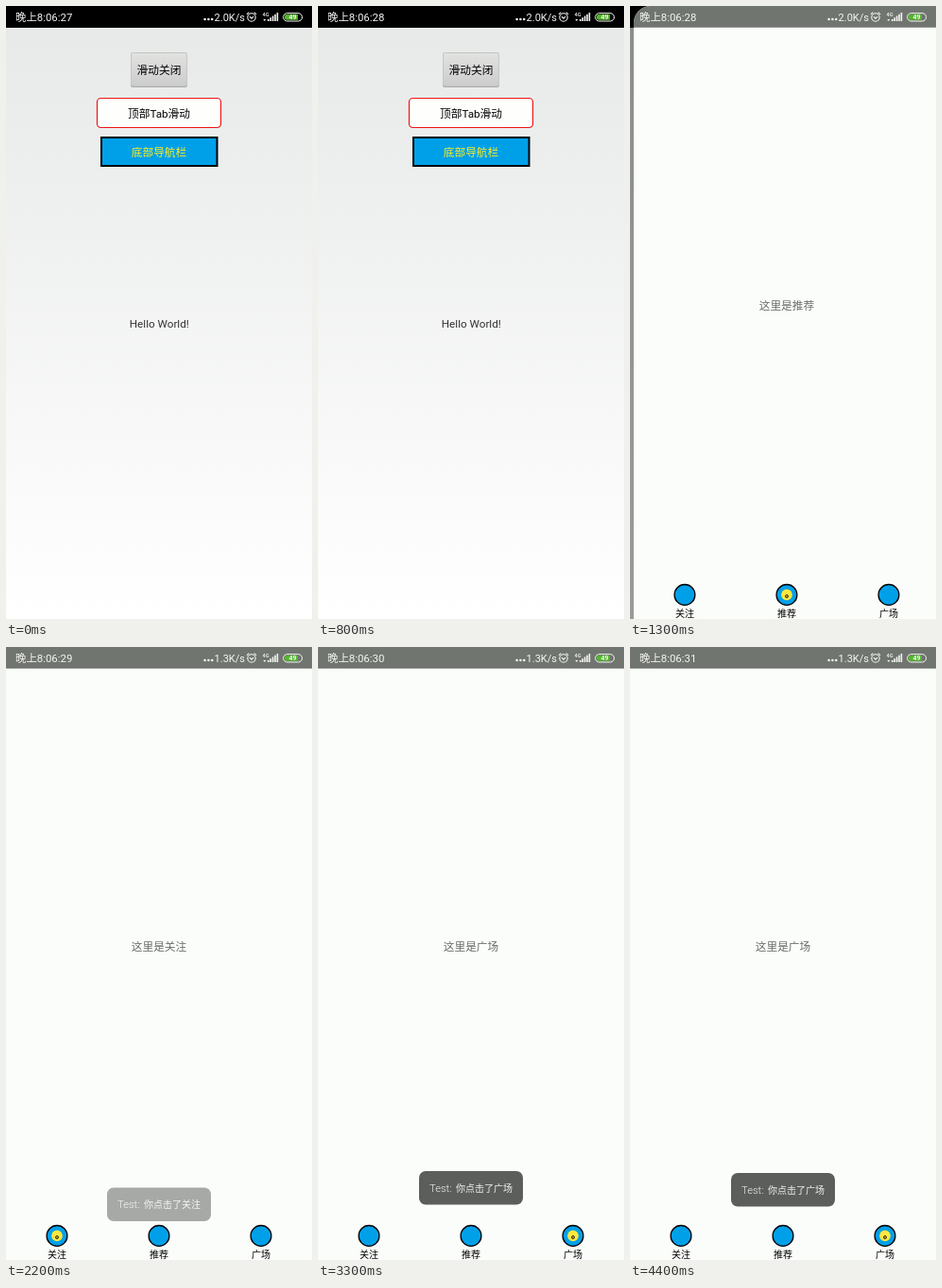
An HTML page for the animation above (4500 ms loop, 324 by 648 pixels).

```html
<!DOCTYPE html>
<html lang="zh-CN">
<head>
<meta charset="utf-8">
<title>Bottom navigation demo</title>
<style>
  html, body { margin: 0; width: 100%; height: 100%; overflow: hidden; background: #000; }
  svg { display: block; width: 100vw; height: 100vh; }
  text { font: 11.7px Roboto, "Noto Sans CJK SC", "Noto Sans CJK", sans-serif; }
  .mid { text-anchor: middle; }
  .status text { fill: #f4f6f3; }
  #toast text, #caption { font-weight: 300; }
</style>
</head>
<body>
<svg viewBox="0 0 324 648" xmlns="http://www.w3.org/2000/svg">
  <defs>
    <linearGradient id="paper" x2="0" y2="1">
      <stop stop-color="#e6e9e7"/><stop offset="1" stop-color="#fff"/>
    </linearGradient>
    <linearGradient id="key" x2="0" y2="1">
      <stop stop-color="#e2e3e1"/><stop offset="1" stop-color="#cbcccb"/>
    </linearGradient>
  </defs>

  <g id="home">
    <rect width="324" height="648" fill="url(#paper)"/>
    <rect width="324" height="23"/>
    <rect x="132" y="50" width="60" height="36" rx="2" fill="#aaacaa"/>
    <rect x="132.5" y="49.5" width="59" height="35" rx="1.5" fill="url(#key)" stroke="#c4c6c4"/>
    <text class="mid" x="162" y="71.5">滑动关闭</text>
    <rect x="96.5" y="97.5" width="131" height="31" rx="4" fill="#fefffd" stroke="#f01414" stroke-width="1.2"/>
    <text class="mid" x="162" y="118.2">顶部Tab滑动</text>
    <rect x="101" y="139" width="122.5" height="30" fill="#00a0e9" stroke="#000" stroke-width="2"/>
    <text class="mid" x="162" y="158.7" fill="#ffee1c">底部导航栏</text>
    <text class="mid" x="162.3" y="340.2" fill="#333">Hello World!</text>
  </g>
  <rect id="dim" width="324" height="648"/>

  <g id="page">
    <path id="sheet" fill="#fbfdfa"/>
    <path id="header" fill="#717570"/>
    <text id="caption" class="mid" x="162" y="320.8" fill="#6c6e6c"></text>
    <g id="tabs"></g>
  </g>

  <g id="toast">
    <rect x="107" width="110" height="35.5" rx="7" fill="#5b5e5a"/>
    <g fill="#f2f4f1">
      <text x="118" y="21.8" style="font-size:11.2px">Test:</text>
      <text id="message" x="146" y="21.8" style="font-size:10px"></text>
    </g>
  </g>

  <g class="status">
    <text id="clock" x="10" y="16" style="font-size:11.4px"></text>
    <g fill="#f4f6f3">
      <circle cx="210.6" cy="14" r="1.3"/><circle cx="214.4" cy="14" r="1.3"/><circle cx="218.2" cy="14" r="1.3"/>
    </g>
    <text id="speed" x="220.6" y="16" style="font-size:11px"></text>
    <g fill="none" stroke="#f4f6f3" stroke-width="1.1">
      <circle cx="260" cy="12" r="4.2"/>
      <path d="M254.9 8.9l2.4-2.2M265.1 8.9l-2.4-2.2M257.9 11.2l2.1 2 2.1-2"/>
    </g>
    <text x="271.5" y="10.7" style="font-size:5.6px;font-weight:500">4G</text>
    <path d="M272.3 14h3l-1.5 2z" fill="#f4f6f3"/>
    <path id="bars" stroke="#f4f6f3" stroke-width="1.6"/>
    <rect x="293.6" y="7.6" width="20" height="8.4" rx="4.2" fill="none" stroke="#f4f6f3"/>
    <path d="M309 8.8H297.8a3 3 0 0 0 0 6H309z" fill="#52b52d"/>
    <text class="mid" x="303.6" y="14.4" style="font-size:7px;font-weight:700">49</text>
  </g>
</svg>

<script>
const LOOP = 4500, STEP = 100;
const TABS = ["关注", "推荐", "广场"];
const TAPS = [[2000, 0], [2300, 2], [3400, 1], [4000, 2]];   // time, tab
const RISE = [[590, 0], [583, .2], [571.5, .52], [559.6, .97], [556, 1], [554, 1]]; // y, opacity
const SLIDE = { start: 865, length: 468 };

const $ = id => document.getElementById(id);
const move = (id, x, y = 0) => $(id).setAttribute("transform", `translate(${x} ${y})`);
const show = (id, on) => $(id).style.display = on ? "" : "none";
const clamp = v => Math.min(1, Math.max(0, v));

$("bars").setAttribute("d", [0, 1, 2, 3, 4].map(i => `M${277.8 + i * 2.4} 16v${-2 - i * 1.75}`).join(""));

$("tabs").innerHTML = TABS.map((name, i) => `
  <g transform="translate(${54 + 108 * i} 622.4)">
    <circle r="10.9" fill="#00a0e9" stroke="#000" stroke-width="1.3"/>
    <g class="pick">
      <circle r="5.8" fill="#ffe83d"/>
      <circle cy="1.6" r="1.5" fill="#d9a520" stroke="#222" stroke-width=".9"/>
    </g>
    <text class="mid" y="23.4" style="font-size:10px">${name}</text>
  </g>`).join("");
const picks = document.querySelectorAll(".pick");

function drawPage(progress) {
  const offset = 324 * (1 - progress);
  const r = progress < 1 ? 18 : 0;
  const panel = h => `M0 ${h}V${r}A${r} ${r} 0 0 1 ${r} 0H324V${h}z`;
  show("page", progress > 0);
  move("page", offset);
  move("home", -81 * progress);
  $("dim").style.opacity = .4 * progress;
  $("sheet").setAttribute("d", panel(648));
  $("header").setAttribute("d", panel(22.8));
}

function drawSelection(t) {
  const tap = TAPS.filter(([at]) => at <= t).pop();
  const active = tap ? tap[1] : 1;
  $("caption").textContent = "这里是" + TABS[active];
  picks.forEach((dot, i) => dot.style.display = i === active ? "" : "none");
  show("toast", tap);
  if (!tap) return;
  const age = Math.min(RISE.length - 1, (t - tap[0]) / STEP);
  const [y, opacity] = RISE[age];
  move("toast", 0, y);
  $("toast").style.opacity = opacity;
  $("message").textContent = "你点击了" + TABS[active];
}

function render(now) {
  const t = Math.floor(now % LOOP / STEP) * STEP;
  const p = clamp((t - SLIDE.start) / SLIDE.length);
  drawPage((1 - Math.cos(Math.PI * p)) / 2);
  drawSelection(t);
  $("clock").textContent = "晚上8:06:" + (27 + Math.floor((t + 400) / 1000));
  $("speed").textContent = t < 1600 ? "2.0K/s" : "1.3K/s";
}

const begin = performance.now();
function tick() {
  render(performance.now() - begin);
  requestAnimationFrame(tick);
}
tick();
</script>
</body>
</html>
```
